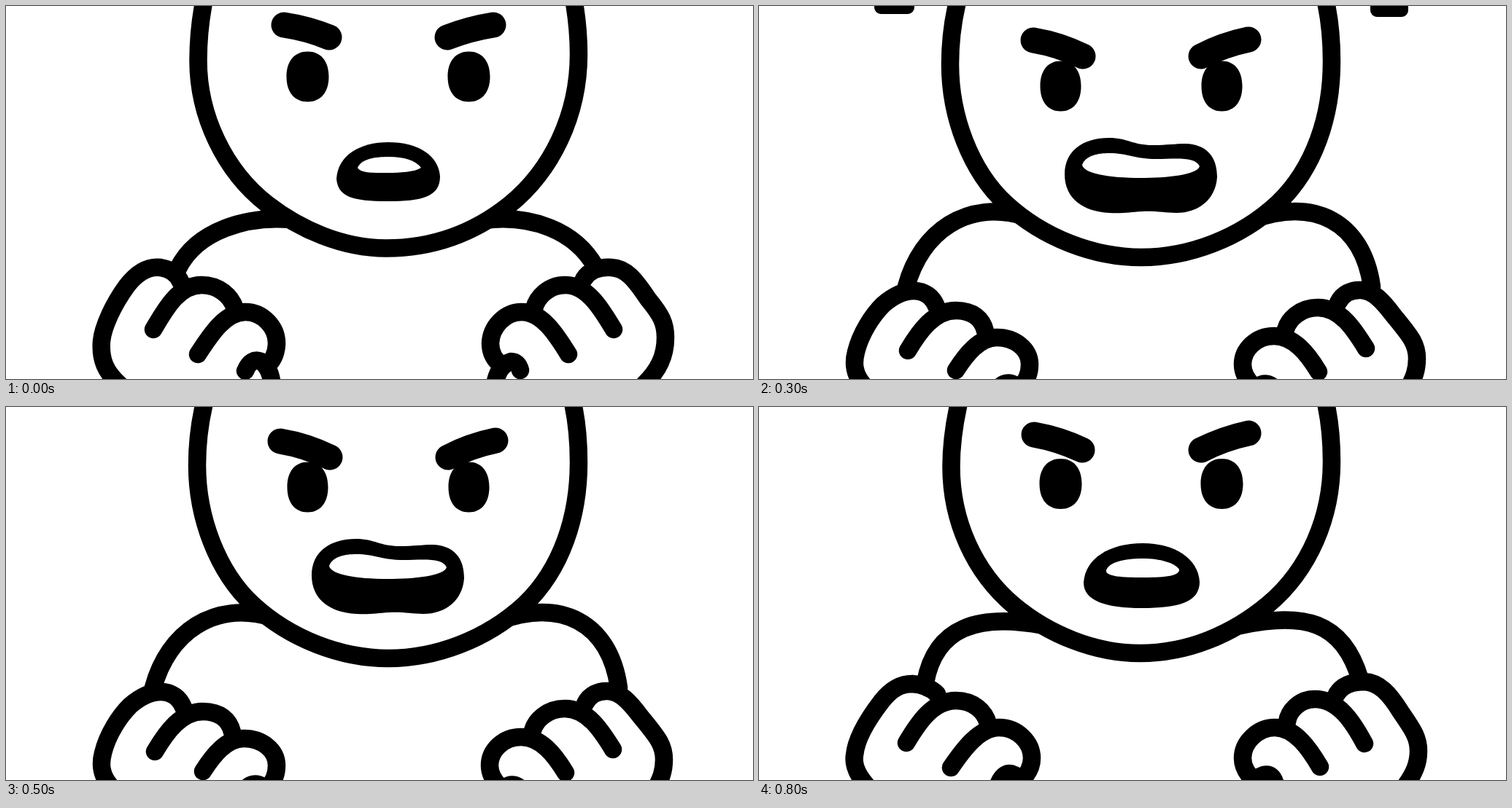
Write an HTML page with a canvas that moves like this. It is 1024 by 512 pixels and loops after 0.9 s.

```html
<!DOCTYPE html>
<html lang="en">
<head>
<meta charset="utf-8">
<title>Angry fists</title>
<style>
  html, body { margin: 0; width: 100%; height: 100%; overflow: hidden; background: #fff; }
  canvas { display: block; }
</style>
</head>
<body>
<canvas id="stage" width="1024" height="512"></canvas>
<script>
const ctx = document.getElementById('stage').getContext('2d');
const STEP = 100;
const LINE = 24.5;
const BROW = 35;

// Slightly squared oval, returned as path data.
function eye(x, y, rx = 29, ry = 34.5) {
  const kx = rx * 0.62, ky = ry * 0.62;
  return `M${x - rx} ${y} C${x - rx} ${y - ky} ${x - kx} ${y - ry} ${x} ${y - ry}
    C${x + kx} ${y - ry} ${x + rx} ${y - ky} ${x + rx} ${y}
    C${x + rx} ${y + ky} ${x + kx} ${y + ry} ${x} ${y + ry}
    C${x - kx} ${y + ry} ${x - rx} ${y + ky} ${x - rx} ${y} Z`;
}

const calm = {
  head: `M272 -10 C267 15 263.5 45 263.5 75 C263.5 150 299 226 358 272 C403 307 462 332.5 521 332.5
    C588 332.5 645 309 690 273 C748 226 785 150 785 66 C785 40 783 18 778 -10`,
  arms: 'M390 293 C330 288 262 308 236 360 M655 294 C720 286 780 308 808 358',
  leftFist: `M156 520 C136 502 129 485 131 460 C133 440 147 410 165 385 C180 365 195 357 212 359 C225 361 235 367 240 380
    M202 444 C218 417 236 383 268 383 C292 383 308 398 314 415
    M263 478 C280 452 300 420 328 420 C352 420 372 441 371 465 C370 478 365 488 357 494
    M328 501 Q336 482 350 488 Q362 496 365 520`,
  rightFist: `M792 375 C800 362 815 358 830 359 C850 360 862 375 880 402 C898 424 904 435 904 455 C904 480 895 500 874 520
    M833 444 C817 417 797 383 767 383 C743 383 728 400 724 415
    M771 478 C755 452 735 420 707 420 C684 420 665 440 664 463 C664 478 672 488 680 494
    M705 500 Q702 488 692 488 Q674 494 670 520`,
  brows: 'M381 26 Q414 31 443 43 M668 26 Q636 31 605 43',
  eyes: eye(413.5, 97) + eye(634.5, 97),
  mouth: `M453 237 C455 205 485 187 524 187 C565 187 593 205 595 234
    C595 262 570 268 523 268 C475 268 455 262 453 237 Z`,
  teeth: `M482 222 C487 210 505 207 525 207 C545 207 562 212 569 222
    C560 228 540 229 523 229 C500 229 486 229 482 222 Z`
};

const cross = {
  head: `M275 -10 C268 20 263.5 50 263.5 82 C263.5 155 294 226 350 273 C397 312 460 338 522 338
    C588 338 649 312 698 271 C755 223 785 150 785 75 C785 45 783 20 776 -10`,
  arms: 'M390 300 C300 283 242 302 228 378 M660 300 C745 282 800 292 824 374',
  leftFist: `M148 520 C133 503 129 490 131 478 C133 455 148 430 168 404 C182 386 195 380 210 380 C224 381 236 386 244 394
    M202 461 C218 434 238 403 270 403 C294 403 310 418 314 435
    M263 495 C280 470 302 440 329 440 C354 440 374 460 374 482 C374 496 366 506 360 512
    M328 518 Q336 498 350 505 Q358 510 360 530`,
  rightFist: `M792 394 C800 381 815 377 830 377 C850 378 864 393 880 419 C898 445 904 455 904 472 C904 490 898 503 886 520
    M830 462 C815 434 795 401 762 401 C740 401 726 418 724 432
    M769 494 C755 470 735 440 707 440 C684 440 663 460 663 482 C663 496 671 506 680 514
    M708 518 Q704 502 692 505 Q676 510 672 530`,
  brows: 'M377 38 Q411 44 443 59 M671 36 Q638 43 606 59',
  eyes: eye(413.5, 105.5) + eye(634.5, 105.5),
  mouth: `M445 241 C447 208 480 187 526 187 C570 187 602 208 604 240
    C604 268 575 276 525 276 C475 276 445 266 445 241 Z`,
  teeth: `M476 224 C480 213 500 208 526 208 C550 208 570 214 576 223
    C577 233 550 234 525 234 C500 234 474 233 476 224 Z`
};

const furious = {
  head: `M273 -10 C265 22 262 50 262 80 C262 152 290 226 338 271 C390 319 460 345 524 345
    C588 345 658 320 711 271 C762 222 785 150 785 76 C785 48 783 20 776 -10`,
  arms: 'M365 289 C285 265 222 310 202 385 M675 294 C760 262 827 295 840 385',
  leftFist: `M143 520 C130 505 129 490 133 475 C139 450 155 425 170 410 C185 397 198 391 212 391 C228 391 238 400 243 412
    M204 473 C220 446 240 418 270 418 C294 418 306 430 310 446
    M270 500 C284 478 302 455 326 455 C351 455 371 471 371 492 C371 506 366 514 360 522
    M324 530 Q336 512 350 520`,
  rightFist: `M794 407 C800 395 812 389 826 390 C842 391 855 405 870 425 C895 455 902 465 902 484 C902 500 898 510 890 525
    M832 470 C816 444 797 414 766 414 C742 414 726 430 722 444
    M767 502 C752 477 733 453 706 453 C682 453 663 471 663 492 C663 506 671 516 680 524
    M711 530 Q698 512 684 522`,
  brows: 'M376 47 Q412 53 444 69 M671 46 Q637 53 606 69',
  eyes: eye(413.5, 110, 28) + eye(634.5, 110, 28),
  mouth: `M419 231 C419 198 445 181 480 181 C505 181 512 191 540 191 C560 191 570 189 585 189
    C612 190 628 205 628 235 C626 265 603 284 572 284 C555 284 545 281 525 282
    C508 283 500 285 480 284 C445 282 419 265 419 231 Z`,
  teeth: `M443 218 C448 205 465 202 480 202 C505 202 515 210 545 210 C570 210 598 206 604 220
    C600 232 560 236 523 236 C480 236 445 230 443 218 Z`
};

// Blends two poses whose paths share the same commands.
function blend(a, b, t) {
  const pose = {};
  for (const part in a) {
    const goal = b[part].match(/-?[\d.]+/g).map(Number);
    let i = 0;
    pose[part] = a[part].replace(/-?[\d.]+/g, n => +n + (goal[i++] - n) * t);
  }
  return pose;
}

function toPaths(pose) {
  return Object.fromEntries(Object.entries(pose).map(([part, d]) => [part, new Path2D(d)]));
}

const low = toPaths(calm);
const rising = toPaths(blend(calm, cross, 0.5));
const mid = toPaths(cross);
const high = toPaths(furious);

// Each entry: pose, and the outward shift of the marks beside the head if they show.
const sequence = [
  [low], [rising], [mid], [high, 0], [high, 51], [high], [high, 0], [high], [mid]
];

function stroke(paths, width) {
  ctx.lineWidth = width;
  paths.forEach(path => ctx.stroke(path));
}

function fill(paths, color) {
  ctx.fillStyle = color;
  paths.forEach(path => ctx.fill(path));
}

function drawMarks(shift) {
  ctx.beginPath();
  ctx.roundRect(158 - shift, -30, 55, 41, 9);
  ctx.roundRect(838 + shift, -30, 52, 45, 9);
  ctx.fill();
}

function draw(time) {
  const [pose, shift] = sequence[Math.floor(time / STEP) % sequence.length];
  ctx.fillStyle = '#fff';
  ctx.fillRect(0, 0, 1024, 512);
  ctx.strokeStyle = '#000';
  ctx.lineCap = ctx.lineJoin = 'round';

  stroke([pose.arms, pose.leftFist, pose.rightFist], LINE);
  fill([pose.head], '#fff');
  stroke([pose.head], LINE);
  stroke([pose.brows], BROW);
  fill([pose.eyes, pose.mouth], '#000');
  if (shift !== undefined) drawMarks(shift);
  fill([pose.teeth], '#fff');
}

let start;
function tick(now) {
  start ??= now;
  draw(now - start);
  requestAnimationFrame(tick);
}
draw(0);
requestAnimationFrame(tick);
</script>
</body>
</html>
```
